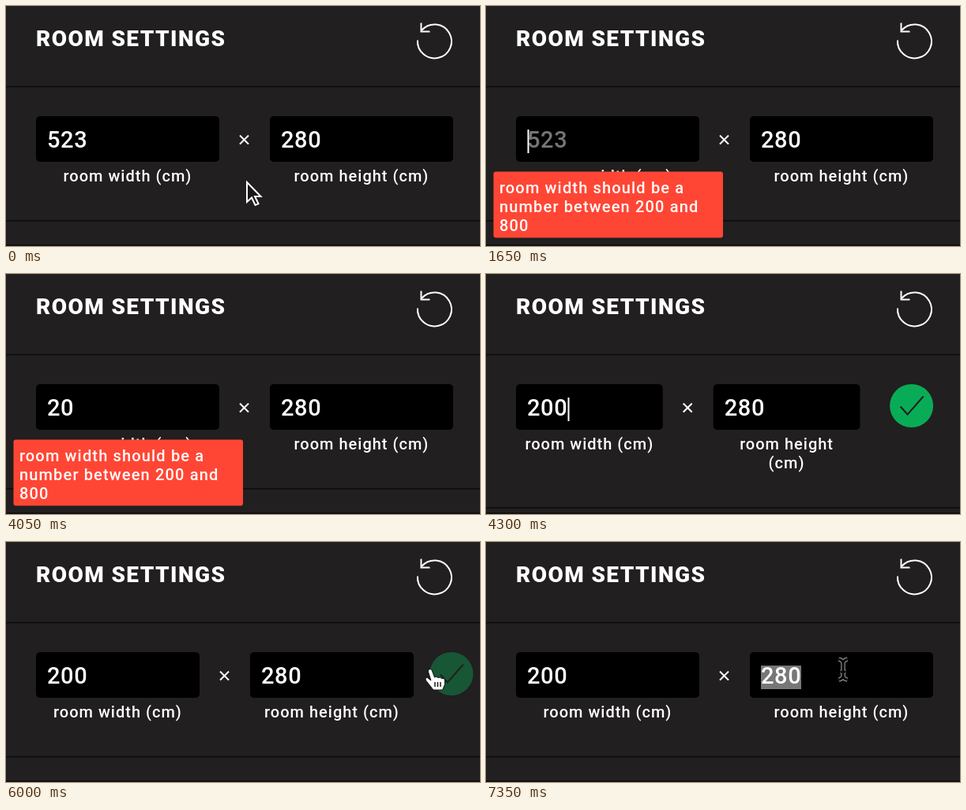
An HTML page that plays this animation: 600 by 305 pixels, repeating every 8000 ms.

```html
<!DOCTYPE html>
<html lang="en">
<head>
<meta charset="utf-8">
<title>Room settings</title>
<style>
  html, body { margin: 0; height: 100%; overflow: hidden; background: #211f20; }
  svg { display: block; width: 600px; height: 305px; font: 500 20px Roboto, sans-serif; fill: #fff; letter-spacing: 1px; }
  .title { font-size: 28px; font-weight: 900; letter-spacing: 1.4px; }
  .value { font-size: 29px; letter-spacing: .6px; }
  .label { text-anchor: middle; }
  .tip { letter-spacing: 1.15px; }
  .rule { stroke: #0c0b0c; stroke-width: 1.6; }
  .line { fill: none; stroke: #fff; stroke-width: 2; }
</style>
</head>
<body>
<svg viewBox="0 0 600 305">
  <defs>
    <path id="beamShape" d="M-5.500 -13Q0 -12 0 -7V7Q0 12 -5.500 13M5.500 -13Q0 -12 0 -7M0 7Q0 12 5.500 13M-3.500 3H3.500"/>
  </defs>

  <text class="title" x="38" y="50.500">ROOM SETTINGS</text>
  <path class="line" d="M526.500 30.500A21.500 21.500 0 1 1 521 43.500M525.500 21.500V32.500H536.500"/>
  <path class="rule" d="M0 102.500H600M0 304H600"/>
  <path class="rule" id="rule" d="M0 273H600"/>

  <g id="width">
    <rect y="140" height="58" rx="5" fill="#000"/>
    <rect class="selection" x="14" y="157" width="51" height="30" fill="#777"/>
    <text class="value" x="14" y="180"></text>
    <text class="label" y="223"><tspan>room width</tspan><tspan> (cm)</tspan></text>
  </g>
  <g id="height">
    <rect y="140" height="58" rx="5" fill="#000"/>
    <rect class="selection" x="14" y="157" width="51" height="30" fill="#777"/>
    <text class="value" x="14" y="180">280</text>
    <text class="label" y="223"><tspan>room height</tspan><tspan> (cm)</tspan></text>
  </g>
  <path class="line" id="times" d="M-5.500 -5.500L5.500 5.500M-5.500 5.500L5.500 -5.500"/>
  <path class="line" id="caret" d="M0 157V187"/>

  <g id="confirm">
    <circle r="27.500" fill="#00e36b"/>
    <path d="M-14 1L-5 11L15 -12" fill="none" stroke="#211f20" stroke-width="2"/>
  </g>

  <g id="tooltip">
    <rect x="9.500" y="210.500" width="290.500" height="84" rx="3" fill="#ff4635"/>
    <text class="tip"><tspan x="17" y="238">room width should be a</tspan><tspan x="17" y="262">number between 200 and</tspan><tspan x="17" y="286">800</tspan></text>
  </g>

  <path id="arrow" stroke="#fff" stroke-width="2" fill="#181718" d="M1 2V27L7 21.500L11.500 31L15.500 29.300L11 20H18.500Z"/>
  <g id="beam" fill="none">
    <use href="#beamShape" stroke="#858585" stroke-width="5.600"/>
    <use href="#beamShape" stroke="#0a0a0a" stroke-width="3"/>
  </g>
  <g id="hand" stroke="#111">
    <path d="M-2.500 2C-3 -2 1.500 -2.500 2.500 1L5.500 9Q8 7 10 9.500Q12.500 8 14.500 10.500Q18 9.500 18.500 13V18L15.500 25H4L-5.500 13Q-7 9 -3.500 9.500L1 13Z"/>
    <path d="M6 15V21M9.500 15V21M13 15V21" stroke-width="1.400"/>
  </g>
</svg>
<script>
const $ = id => document.getElementById(id);
const LOOP = 8000, LEFT = 38, RIGHT = 566, GAP = 64, SLOT = 115, FADE = 400;
const CLEAR = 1650, VALID = 4100, CLICK = 5870;

// Pointer hot spot: time, x, y
const path = [
  [200, 304, 222], [820, 170, 170], [1040, 170, 170], [1100, 185, 171],
  [2600, 185, 171], [3000, 155.5, 170.5], [5040, 155.5, 170.5], [5370, 517, 160],
  [5550, 517, 160], [5800, 537, 163], [6640, 537, 163], [6880, 492, 150],
  [7200, 452, 162]
];

const clamp = v => Math.min(1, Math.max(0, v));
const within = (t, a, b) => t >= a && t < b;
const show = (el, on) => el.style.display = on ? '' : 'none';
const move = (el, x, y = 0) => el.setAttribute('transform', `translate(${x} ${y})`);

// cubic-bezier(.25, .1, .25, 1)
function ease(x) {
  const curve = (a, b, u) => 3 * a * u * (1 - u) ** 2 + 3 * b * u * u * (1 - u) + u ** 3;
  let lo = 0, hi = 1;
  for (let i = 0; i < 20; i++) {
    const mid = (lo + hi) / 2;
    if (curve(.25, .25, mid) < x) lo = mid; else hi = mid;
  }
  return curve(.1, 1, lo);
}

function pointerAt(t) {
  const next = path.findIndex(k => k[0] > t);
  if (next === 0) return path[0].slice(1);
  if (next < 0) return path[path.length - 1].slice(1);
  const [a, b] = [path[next - 1], path[next]];
  const u = (t - a[0]) / (b[0] - a[0]), s = u * u * (3 - 2 * u);
  return [a[1] + (b[1] - a[1]) * s, a[2] + (b[2] - a[2]) * s];
}

function layoutField(id, x, width, textWidth) {
  const field = $(id), label = field.querySelector('.label');
  const wrap = textWidth + 20 > width;
  move(field, x);
  field.firstElementChild.setAttribute('width', width);
  label.setAttribute('x', width / 2);
  const unit = label.lastElementChild;
  unit.textContent = wrap ? '(cm)' : '\u00a0(cm)';
  if (wrap) {
    unit.setAttribute('x', width / 2);
    unit.setAttribute('dy', 24);
  } else {
    unit.removeAttribute('x');
    unit.removeAttribute('dy');
  }
  return wrap;
}

function setValue(t) {
  const text = $('width').querySelector('.value');
  const typed = t < 3500 ? '' : t < 3780 ? '2' : t < VALID ? '20' : '200';
  text.textContent = t < CLEAR ? '523' : typed || '523';
  text.style.fill = within(t, CLEAR, 3500) ? '#757575' : '#fff';
  const start = t < 3500 ? CLEAR : t < VALID ? 3500 : VALID;
  show($('caret'), within(t, CLEAR, CLICK) && (t - start) % 1000 < 500);
  move($('caret'), 53.5 + typed.length * 17);
}

function setPointer(t) {
  const [x, y] = pointerAt(t);
  const hidden = within(t, CLEAR, 2600) || within(t, 3500, 5050);
  const inField = within(y, 140, 198) && (within(x, 38, 271) || within(x, 334, 566));
  const kind = within(t, 5300, 6680) ? 'hand' : inField ? 'beam' : 'arrow';
  for (const id of ['arrow', 'beam', 'hand']) {
    show($(id), !hidden && id === kind);
    move($(id), x, y);
  }
}

function render(t) {
  const open = ease(clamp((t - VALID) / FADE)) - ease(clamp((t - CLICK) / FADE));
  const slot = SLOT * open;
  const width = (RIGHT - LEFT - GAP - slot) / 2;
  const second = LEFT + width + GAP;
  const wrapWidth = layoutField('width', LEFT, width, 164);
  const wrapHeight = layoutField('height', second, width, 172);
  move($('rule'), 0, wrapWidth || wrapHeight ? 24 : 0);
  move($('times'), second - GAP / 2 - .5, 170);
  move($('confirm'), RIGHT - slot * .593 + 27.5, 167.5);
  $('confirm').style.opacity = Math.max(0, open) ** 1.5;
  show($('tooltip'), within(t, CLEAR, VALID));
  show($('width').querySelector('.selection'), within(t, 950, CLEAR));
  show($('height').querySelector('.selection'), t >= 7300);
  setValue(t);
  setPointer(t);
}

const began = performance.now();
function tick() {
  render((performance.now() - began) % LOOP);
  requestAnimationFrame(tick);
}
tick();
</script>
</body>
</html>
```
